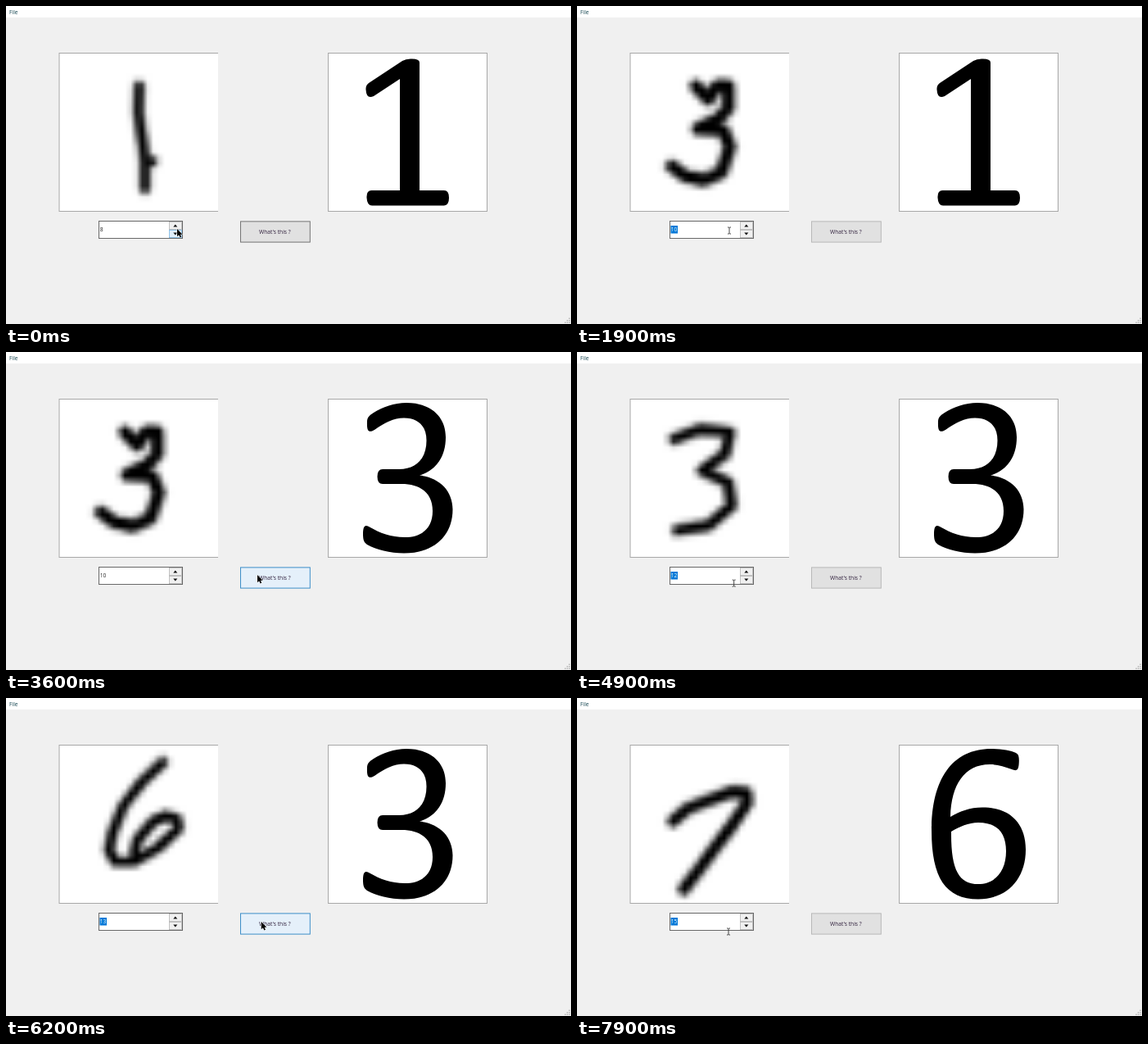
An HTML page with a canvas for the animation above (8000 ms loop, 690x388 px).

```html
<!DOCTYPE html>
<html lang="en">
<head>
<meta charset="utf-8">
<title>Digit recognizer</title>
<style>
html, body { margin: 0; width: 100%; height: 100%; overflow: hidden; background: #f0f0f0; }
svg, canvas { position: absolute; display: block; }
svg { left: 0; top: 0; }
canvas { left: 65.5px; top: 58px; width: 193px; height: 192px; }
text { font: 6.7px "Open Sans", "Noto Sans", sans-serif; fill: #222; }
.panel { fill: #fff; stroke: #a8a8a8; }
</style>
</head>
<body>
<svg width="690" height="388" viewBox="0 0 690 388">
  <rect width="690" height="388" fill="#f0f0f0"/>
  <rect width="690" height="14" fill="#fff"/>
  <text x="4" y="9.8" style="fill:#1b4a55">File</text>
  <rect class="panel" x="65" y="57.5" width="193.5" height="193"/>
  <rect class="panel" x="393.5" y="57.5" width="194" height="193"/>
  <path id="answer" fill-rule="evenodd"/>

  <rect x="113.5" y="262.5" width="102" height="21" fill="#fff" stroke="#686868"/>
  <rect id="mark" x="114.5" y="268" width="8.5" height="9.5" fill="#0078d7"/>
  <text id="value" x="114.8" y="275.4"></text>
  <g fill="#f0f0f0" stroke="#b4b4b4" stroke-width=".8">
    <rect x="199.5" y="263.4" width="15" height="9.2"/>
    <rect id="down" x="199.5" y="273.4" width="15" height="9.2"/>
  </g>
  <path d="M204.3 269.5l2.5-3l2.5 3zM204.3 276.5l2.5 3l2.5-3z" fill="#111"/>

  <rect id="button" x="286.5" y="262.9" width="84.8" height="25.2"/>
  <text x="309" y="278" style="fill:#30203c">What's this ?</text>

  <path d="M688 380.5v7M685.5 383v4.5M683 385.5v2" stroke="#b0b0b0" stroke-width="1.4" stroke-dasharray="1.5 1"/>
  <g id="cursor">
    <path id="arrow" d="M0 0V9.2L2.1 7.3L3.6 10.4L5.2 9.6L3.8 6.7H6.6Z" stroke="#fff" stroke-width=".8" paint-order="stroke"/>
    <path id="beam" d="M-2 -4H-.5L0 -3.5L.5 -4H2M0 -3.5V3.5M-2 4H-.5L0 3.5L.5 4H2" fill="none" stroke="#333" stroke-width=".9"/>
  </g>
</svg>
<canvas id="sample" width="28" height="28"></canvas>
<script>
const $ = id => document.getElementById(id);
const LOOP = 8000, STEP = 100;

// Handwriting by sample index: core width and centre line in stage pixels
const strokes = {
  8: [10, "M162 98L161 130L166 165L169 190L169 224M169 189L178 190"],
  9: [10, "M122 97L116 135L130 150L178 141M194 92L183 145L174 225"],
  10: [13, "M145 98L160 114L170 98L184 98L184 125L172 138L147 150L178 152L186 172L176 203L155 213L131 208L115 196"],
  11: [11, "M214 94L162 100L148 140L174 160L172 195L138 213L94 213"],
  12: [11, "M118 106L150 94L186 98L180 125L152 145L184 160L188 188L160 212L122 218"],
  13: [10, "M191 78L165 103L143 131L130 163L125 186L133 200L156 200L185 183L210 160L208 148L194 144L179 151L160 173L156 192"],
  14: [10, "M175 92L166 155L155 226"],
  15: [12, "M117 150L133 136L160 125L190 114L206 116L207 128L186 159L166 185L147 212L130 234"]
};

const glyphs = {
  1: "M481 225V89L449 110Q440 114 439.5 102Q439 97 443 94L484 67Q488 64.5 494 64.5Q505 64 505 69V225H535Q541 225 541 234T535 243.5H447Q441 243.5 440.5 234T447 225Z",
  3: "M441 85C441 80 444 77 449 74C460 67 474 62 489 62C518 62 537 78 537 104C537 129 524 145 505 150.5C529 153 545.5 169 545.5 192C545.5 225 522 245.5 486 245.5C469 245.5 452 241 441 235C437 232 436 229 436 222C436 213 438 210 443 213C457 221 470 226 487 226C509 226 521 214 521 194C521 172 506 161 483 161H460Q453.5 161 453.5 152T460 143H480C501 143 513.5 130 513.5 108C513.5 91 504 80.5 486 80.5C473 80.5 463 86 450 95C443 99 440.5 97 441 85Z",
  6: "M539 70C540 73 540 77 539.5 82C538.5 89 536 89 531 87C521 83.5 514 81 504 81C473 81 457 106 456 145C468 138 480 133.5 495 133.5C529 133.5 548 153 548 185C548 221 525 245.5 490 245.5C450 245.5 433 219 433 162C433 99 458 62 506 62C518 62 530 64 536 67Q538 68 539 70ZM457 163C467 157 478 152 490 152C513 152 524 164 524 187C524 211 511 227 490 227C466 227 456.5 209 457 163Z"
};

// Timelines: [time, state]
const values = [[0, 8], [1600, 9], [1900, 10], [4500, 11], [4900, 12], [5400, 13], [7200, 14], [7600, 15]];
const answers = [[0, 1], [3300, 3], [6300, 6]];
const focus = [[0, "button"], [700, "field"], [1600, "selected"], [3300, "button"],
  [4500, "selected"], [6300, "button"], [7200, "selected"]];
const path = [[0, 209, 272], [100, 209, 272], [900, 184, 275], [1500, 184, 275], [1700, 186, 274],
  [2800, 186, 274], [3200, 310, 273], [3600, 307, 272], [4300, 190, 277], [4500, 190, 280],
  [5400, 194, 285], [6100, 312, 273], [6400, 311, 273], [6900, 191, 287], [7200, 185, 285], [8000, 185, 285]];

const at = (list, t) => list.findLast(k => k[0] <= t)[1];

function pointer(t) {
  const i = path.findIndex(k => k[0] > t);
  const [a, x, y] = path[i - 1], [b, u, v] = path[i];
  const p = (t - a) / (b - a), e = p * p * (3 - 2 * p);
  return [x + (u - x) * e, y + (v - y) * e];
}

const ctx = $("sample").getContext("2d");
let shown;

// Drawn on a 28 x 28 grid; the browser's smooth scaling gives the soft look
function drawSample(index) {
  if (index === shown) return;
  shown = index;
  const [width, d] = strokes[index], line = new Path2D(d), k = 28 / 193;
  ctx.setTransform(k, 0, 0, k, -65.5 * k, -58 * k);
  ctx.globalAlpha = 1;
  ctx.fillStyle = "#fff";
  ctx.fillRect(60, 50, 210, 210);
  ctx.lineCap = ctx.lineJoin = "round";
  for (const [extra, alpha] of [[10, .15], [5, .35], [0, 1]]) {
    ctx.globalAlpha = alpha;
    ctx.lineWidth = width + extra;
    ctx.stroke(line);
  }
}

function paint(id, fill, stroke) {
  $(id).setAttribute("fill", fill);
  $(id).setAttribute("stroke", stroke);
}

function render(now) {
  const t = Math.floor(now % LOOP / STEP) * STEP;
  const [x, y] = pointer(t), value = at(values, t), state = at(focus, t);
  const selected = state === "selected", beam = x < 199;

  drawSample(value);
  $("answer").setAttribute("d", glyphs[at(answers, t)]);
  $("value").textContent = value;
  $("value").style.fill = selected ? "#fff" : "#222";
  $("mark").style.display = selected ? "" : "none";

  if (x > 286 && x < 372) paint("button", "#e5f0fa", "#3c8ec8");
  else paint("button", "#e1e1e1", state === "button" ? "#747474" : "#b8b8b8");
  if (x > 199 && x < 215 && y < 283) paint("down", "#e0effb", "#7ab5e2");
  else paint("down", "#f0f0f0", "#b4b4b4");

  $("cursor").setAttribute("transform", `translate(${x} ${y})`);
  $("beam").style.display = beam ? "" : "none";
  $("arrow").style.display = beam ? "none" : "";
  requestAnimationFrame(render);
}
requestAnimationFrame(render);
</script>
</body>
</html>
```
